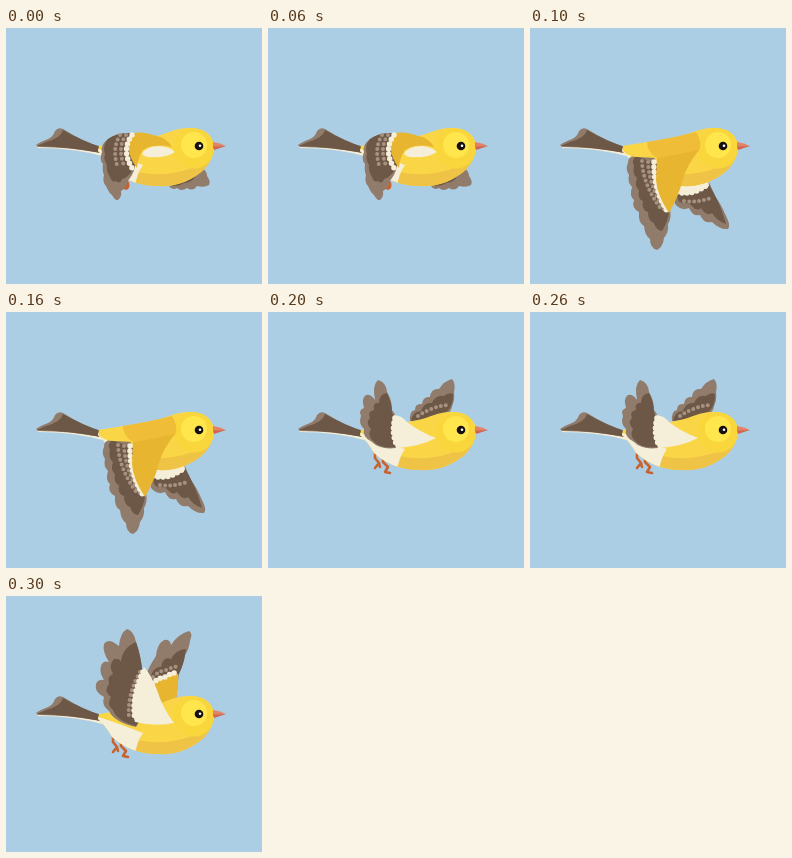
Write an HTML page that moves like this. It is 256 px wide and 256 px high and loops after 0.4 s.

```html
<!DOCTYPE html>
<html lang="en">
<head>
<meta charset="utf-8">
<title>Flying bird</title>
<style>
  html, body { margin: 0; width: 100%; height: 100%; overflow: hidden; background: #accee5; }
  svg { display: block; width: 100%; height: 100%; }
  .pose { visibility: hidden; animation: show 400ms step-end infinite; }
  .level { animation-delay: 0ms; }
  .down { animation-delay: -300ms; }
  .half { animation-delay: -200ms; }
  .up { animation-delay: -100ms; }
  @keyframes show {
    0% { visibility: visible; }
    25%, 100% { visibility: hidden; }
  }
  .brown { fill: #917c6c; }
  .dark { fill: #6d5746; }
  .yellow { fill: #fad647; }
  .gold { fill: #f0bd38; }
  .wing { fill: #e8b531; }
  .cream { fill: #f5eed8; }
  /* Rounded zero-length dashes make the scalloped feather rows. */
  .row { fill: none; stroke: #f5eed8; stroke-width: 5.5; stroke-linecap: round; stroke-dasharray: 0 5; }
  .row.pale { stroke: #a79280; stroke-width: 4; }
  .leg { fill: none; stroke: #c8622f; stroke-width: 2.6; stroke-linecap: round; stroke-linejoin: round; }
</style>
</head>
<body>
<svg viewBox="0 0 256 256">
  <defs>
    <path id="torso" d="M93 118C115 115 135 111 150 108C163 105 172 99 184 100C198 100 207 107 208 118C208 130 201 141 191 147C180 155 166 159 151 158C131 158 116 150 106 141Q100 130 92 123Z"/>
    <clipPath id="inside"><use href="#torso"/></clipPath>
    <g id="legs" class="leg">
      <path d="M107 139L107 146L111 151L107 156M111 151L112 155"/>
      <path d="M115 145L115 150L120 155L117 160L122 161"/>
    </g>
    <g id="body">
      <path class="cream" d="M32 118Q62 118 95 121L100 129Q70 120 32 120Z"/>
      <path class="brown" d="M95 119Q76 113 57 101Q52 99 49 103Q47 109 42 111Q34 114 30 117L32 119Q64 119 95 125Z"/>
      <path class="dark" d="M95 119Q76 113 57 102Q55 110 40 114L31 118Q64 119 95 125Z"/>
      <use href="#torso" class="yellow"/>
      <g clip-path="url(#inside)">
        <path fill="#efc446" d="M126 142C148 150 184 148 209 126L200 162H120Z"/>
        <path class="cream" d="M90 120Q112 127 137 137Q130 147 129 160L90 150Z"/>
        <circle cx="188" cy="120" r="20.500" fill="#f9d63c"/>
        <circle cx="188" cy="117" r="13" fill="#ffe64d"/>
      </g>
      <path d="M207 114Q214 115 220 118L207 119Z" fill="#e58263"/>
      <path d="M207 118.500L220 118L208 122Z" fill="#d0644d"/>
      <circle cx="193" cy="118" r="4.300" fill="#16100d"/>
      <circle cx="194" cy="117.800" r="1.300" fill="#fff"/>
    </g>
  </defs>

  <g class="pose level">
    <path class="brown" d="M162 156Q165 163 171 160Q175 164 181 160Q187 164 191 158Q198 160 203 157Q205 153 201 148Q201 143 196 140L176 148Z"/>
    <path class="dark" d="M162 156Q172 160 178 155Q186 155 190 147L180 146Z"/>
    <ellipse cx="120" cy="157" rx="3.500" ry="5" fill="#c8622f"/>
    <use href="#body"/>
    <path class="brown" d="M127 105Q111 104 102 111Q94 117 96 124Q93 132 97 136Q96 143 98 147Q96 154 100 158Q103 165 106 167Q109 173 112 172Q116 169 115 163Q121 160 121 154Q127 147 129 139Z"/>
    <path class="dark" d="M127 105Q111 104 102 111Q96 118 99 126Q97 131 101 137Q100 143 104 149Q106 155 110 153Q114 157 116 151Q121 151 129 139Z"/>
    <path class="row pale" d="M120 107Q111 119 118 138M114 107Q106 120 111 137"/>
    <path class="wing" d="M127 105Q138 103 150 108Q160 109 166 119Q148 115 137 122Q132 129 131 140Q117 122 127 105Z"/>
    <path class="row" d="M126 107Q115 122 126 140"/>
    <path class="cream" d="M136 126Q140 118 154 118Q164 119 169 124Q160 130 148 129Q140 130 136 126Z"/>
  </g>

  <g class="pose down">
    <path class="brown" d="M147 165Q142 175 147 178Q152 183 159 180Q163 189 170 187Q174 196 182 194Q190 202 198 201Q201 197 196 188Q191 176 185 168L178 152L153 159Z"/>
    <path class="dark" d="M148 166Q146 173 152 175Q158 174 162 178Q167 184 171 180Q177 189 182 185Q187 193 196 196Q191 176 178 155Z"/>
    <path class="cream" d="M145 163L151 155L178 150L179 158Q163 169 145 163Z"/>
    <path class="row" d="M147 164Q163 168 177 157"/>
    <path class="row pale" d="M154 173Q170 175 183 169"/>
    <use href="#body"/>
    <path class="brown" d="M106 127Q97 129 98 135Q95 141 99 147Q97 154 102 159Q99 168 104 172Q101 180 109 184Q108 195 114 198Q115 208 120 211Q120 220 127 222Q133 219 134 210Q139 204 138 196Q142 190 140 181L133 155L124 128Z"/>
    <path class="dark" d="M106 128Q101 132 104 138Q102 146 107 150Q104 158 109 162Q107 171 113 173Q111 182 118 184Q118 193 124 195Q126 202 132 203Q138 194 139 184L127 136Z"/>
    <path class="row pale" d="M112 133Q113 157 131 181M118 134Q119 158 135 183"/>
    <path class="row" d="M124 134Q123 160 137 183"/>
    <path class="yellow" d="M93 118L118 114L127 130L108 129Q99 129 93 123Z"/>
    <path class="gold" d="M117 114C135 111 150 108 166 104Q173 115 169 123L127 130Q117 124 117 114Z"/>
    <path class="wing" d="M127 130Q150 126 169 122Q157 137 153 151Q148 170 139 185Q127 167 126 152Z"/>
  </g>

  <g class="pose half">
    <path class="brown" d="M142 109Q141 99 147 98Q147 91 154 92Q155 84 162 85Q163 76 171 77Q176 69 184 67Q188 71 186 80Q187 88 184 94Q184 99 178 102L164 107Z"/>
    <path class="dark" d="M143 109Q145 99 153 99Q156 90 164 91Q168 82 176 84Q181 80 185 82Q186 95 176 102L164 107Z"/>
    <path class="row pale" d="M150 104Q165 94 181 93"/>
    <use href="#legs"/>
    <use href="#body"/>
    <path class="brown" d="M128 136Q112 138 104 130Q94 125 96 117Q90 112 93 104Q90 98 96 96Q93 86 98 83Q103 82 107 88Q104 73 110 68Q118 70 119 80Q124 88 124 98Q129 104 129 110L134 124Z"/>
    <path class="dark" d="M128 135Q112 137 105 129Q99 123 103 117Q97 111 102 106Q99 99 106 98Q104 90 111 91Q111 82 119 81Q124 91 124 100L131 120Z"/>
    <path class="cream" d="M125 104Q132 102 139 110Q152 120 168 126Q151 135 128 136Q122 120 125 104Z"/>
    <path class="row" d="M127 106Q123 121 129 134"/>
  </g>

  <g class="pose up">
    <path class="brown" d="M138 84Q143 70 150 60Q151 48 158 44Q164 43 165 49Q172 38 183 35Q187 37 184 45Q183 53 179 59Q178 68 173 76L170 104L150 102Z"/>
    <path class="dark" d="M143 85Q147 70 155 71Q157 60 165 63Q169 54 180 53Q178 68 173 78L150 95Z"/>
    <path class="row pale" d="M147 81Q154 74 161 74Q168 70 173 71"/>
    <path class="wing" d="M145 91Q152 82 161 82Q168 77 172 78Q173 92 169 107L151 108Z"/>
    <path class="row" d="M146 88Q153 81 160 81Q166 76 171 77"/>
    <use href="#legs"/>
    <use href="#body"/>
    <path class="brown" d="M130 131Q108 126 103 115Q95 109 98 101Q88 96 90 88Q92 83 98 84Q93 76 95 70Q97 64 103 66Q96 55 98 48Q101 43 107 46L113 50Q114 37 121 33Q128 35 130 46Q134 56 136 72L143 110Z"/>
    <path class="dark" d="M130 130Q111 125 107 114Q100 108 105 101Q97 95 103 88Q101 80 107 78Q102 69 108 63Q113 62 115 66Q116 52 130 46Q135 60 137 80L142 110Z"/>
    <path class="cream" d="M138 71Q146 80 151 94Q157 113 168 127Q150 131 129 126Q122 108 138 71Z"/>
    <path class="row pale" d="M134 76Q121 98 123 122"/>
    <path class="row" d="M137 76Q125 100 129 124"/>
  </g>
</svg>
</body>
</html>
```
